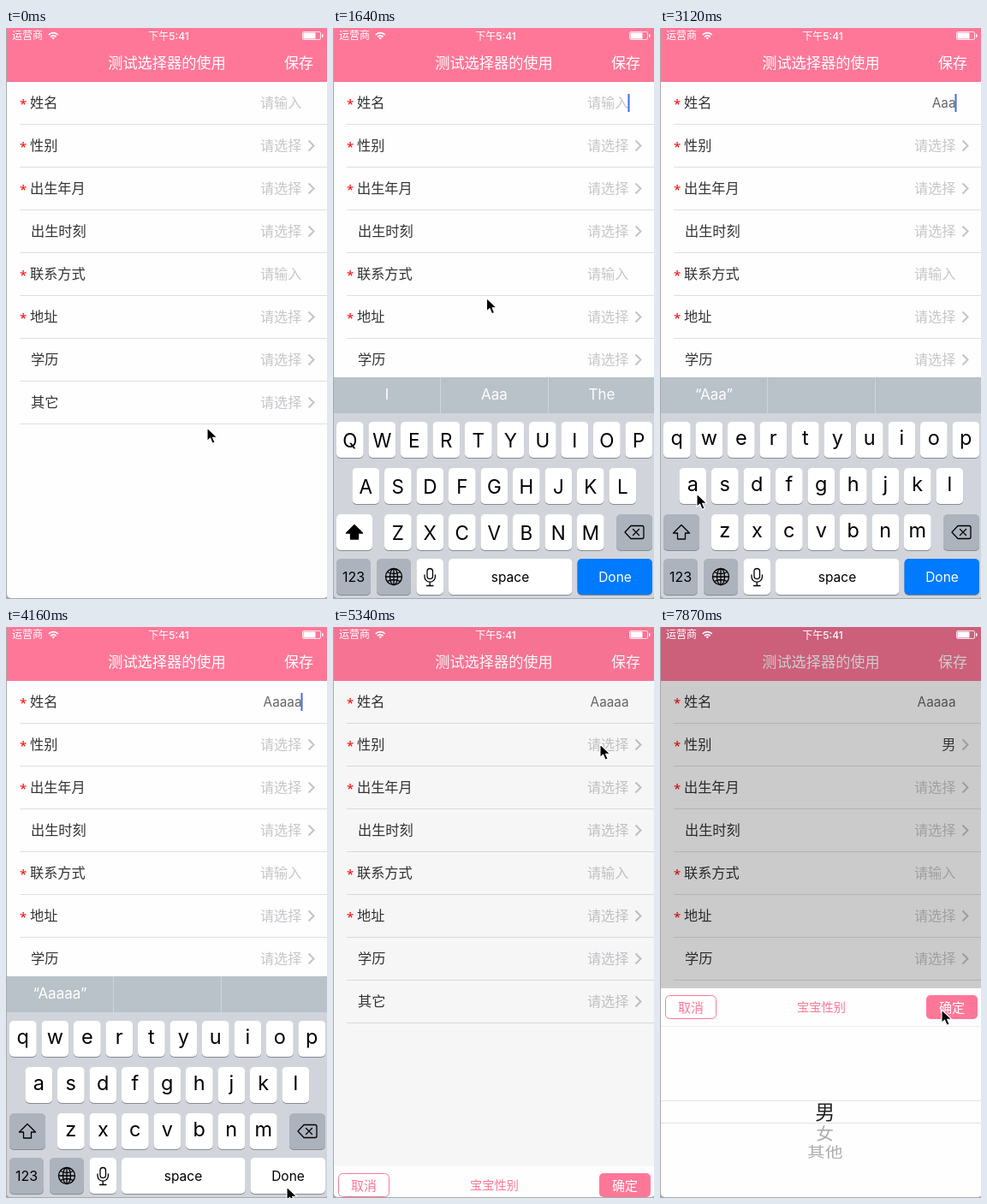
Write an HTML page that moves like this. It is 375 by 667 pixels and loops after 8000 ms.

```html
<!DOCTYPE html>
<html lang="zh-CN">
<head>
<meta charset="utf-8">
<title>测试选择器的使用</title>
<style>
  html, body { margin: 0; width: 100%; height: 100%; overflow: hidden; background: #a9a9a9; }
  svg { display: block; width: 100vw; height: 100vh; }
  text { font-family: Inter, "Noto Sans CJK SC", "Noto Sans CJK", sans-serif; white-space: pre; }
  .icon { fill: none; stroke: #000; stroke-width: 1.3; stroke-linejoin: round; stroke-linecap: round; }
</style>
</head>
<body>
<svg id="stage" viewBox="0 0 375 667"></svg>
<script>
const PINK = '#ff7798';
const TICK = 148.2, FIRST_TICK = 296, LOOP = 8000;

// ---- markup helpers; y is the visual middle of the line ----
const rect = (x, y, w, h, fill, extra = '') =>
  `<rect x="${x}" y="${y}" width="${w}" height="${h}" fill="${fill}" ${extra}/>`;
const text = (x, y, str, size, fill, anchor = 'start', extra = '') =>
  `<text x="${x}" y="${y + size * 0.37}" font-size="${size}" fill="${fill}" text-anchor="${anchor}" ${extra}>${str}</text>`;
const group = (id, body) => `<g id="${id}">${body}</g>`;

// ---- form ----
const rows = [
  ['姓名', true, '请输入'], ['性别', true, '请选择'], ['出生年月', true, '请选择'],
  ['出生时刻', false, '请选择'], ['联系方式', true, '请输入'], ['地址', true, '请选择'],
  ['学历', false, '请选择'], ['其它', false, '请选择']
];

function formRow([label, required, hint], i) {
  const y = 87 + 50 * i;
  return (required ? text(16, y + 1, '*', 15, '#f00', 'start', 'style="font-family:\'Noto Sans\',sans-serif"') : '') +
    text(required ? 28 : 29, y, label, 16.2, '#333') +
    text(345.5, y, hint, 16.2, '#c7c7cb', 'end', `id="value${i}"`) +
    (hint === '请选择'
      ? `<path d="M353.5 ${y - 5.5}l6 6-6 6" fill="none" stroke="#c4c4c6" stroke-width="2"/>` : '') +
    rect(16, y + 25, 359, 1, '#dfdfe1');
}

const form = rect(1, 0, 375, 667, '#fefefe') + rect(1, 0, 375, 63, PINK) +
  text(188, 41, '测试选择器的使用', 17.2, '#fff', 'middle', 'font-weight="500"') +
  text(325, 41, '保存', 17, '#fff') +
  rows.map(formRow).join('') +
  rect(344.5, 77, 2, 21, '#4169e1', 'id="caret"');

const statusBar =
  text(7, 9, '运营商', 12, '#fff') +
  text(190, 9.3, '下午5:41', 12, '#fff', 'middle', 'font-weight="500"') +
  `<g fill="none" stroke="#fff" stroke-width="1.7"><path d="M49.8 8a7.6 7.6 0 0 1 11 0M52 10.3a4.6 4.6 0 0 1 6.6 0"/></g>
   <path d="M53.6 11.6a2.4 2.4 0 0 1 3.4 0L55.3 13.6z" fill="#fff"/>` +
  rect(346.5, 4.5, 21, 9, 'none', 'rx="1.5" stroke="#fff" stroke-width=".8"') +
  rect(347.5, 5.5, 14, 7, '#fff', 'rx=".6"') +
  rect(369, 7, 1.5, 4, '#fff', 'rx=".7"');

// ---- keyboard ----
const key = (x, y, w, fill = '#fff', id = '') =>
  rect(x, y + 1, w, 42, '#878b91', 'rx="5"') +
  rect(x, y, w, 42, fill, `rx="5" ${id && `id="${id}"`}`);
const letterRows = [['QWERTYUIOP', 4, 460], ['ASDFGHJKL', 22.5, 514], ['ZXCVBNM', 60, 568]];
const eachLetter = fn => letterRows.map(([chars, x, y]) =>
  [...chars].map((c, i) => fn(c, x + 37.5 * i, y)).join('')).join('');
const GREY = '#adb3bd';

const icons = `<g class="icon">
  <path id="shift" d="M25 580.5l9.5 9.5h-5v7h-9v-7h-5z"/>
  <path d="M341 589l7-7.5h13q2 0 2 2v11q0 2-2 2h-13zM350.5 585.5l7 7m0-7l-7 7"/>
  <circle cx="71" cy="641" r="9.5"/><ellipse cx="71" cy="641" rx="4.5" ry="9.5"/>
  <path d="M71 631.5v19M61.5 641h19M63.5 635.5q7.5 4 15 0M63.5 646.5q7.5-4 15 0"/>
  <rect x="110" y="631.5" width="6.5" height="12" rx="3.2"/>
  <path d="M107 639v2a6.2 6.2 0 0 0 12.4 0v-2M113.2 647.5v4M109.5 651.5h7.5"/></g>`;

const popup = `<path d="M16 459h45q7 0 7 7v33c0 9-13.5 9-13.5 19v33q0 5-5 5h-22q-5 0-5-5v-33c0-10-13.5-10-13.5-19v-33q0-7 7-7z"
  fill="#fff" stroke="#9a9ea5" stroke-width=".7"/>` +
  text(38.3, 484, 'A', 34, '#000', 'middle', 'id="popupLetter"');

const keyboard = rect(0, 408, 376, 260, '#d1d5db') + rect(0, 408, 376, 42, '#b9c1c9') +
  rect(125, 408, 1, 42, '#d1d5db') + rect(251, 408, 1, 42, '#d1d5db') +
  ['I', 'Aaa', 'The'].map((s, i) => text(63 + 125.5 * i, 427.5, s, 17, '#fff', 'middle', `id="hint${i}"`)).join('') +
  eachLetter((c, x, y) => key(x, y, 31.7)) +
  group('upper', eachLetter((c, x, y) => text(x + 15.8, y + 21.3, c, 22.5, '#000', 'middle'))) +
  group('lower', eachLetter((c, x, y) => text(x + 15.8, y + 18.7, c.toLowerCase(), 23.5, '#000', 'middle'))) +
  key(4, 568, 42, '#fff', 'shiftKey') + key(331, 568, 42, GREY) +
  key(4, 620, 40, GREY) + key(51, 620, 40, GREY) + key(97.5, 620, 31.5) +
  key(135, 620, 144.5) + key(285.5, 620, 87.5, '#007aff', 'doneKey') +
  text(24, 641.5, '123', 16, '#000', 'middle') +
  text(207, 641, 'space', 15.5, '#000', 'middle') +
  text(329.5, 641, 'Done', 15.5, '#fff', 'middle', 'id="doneText"') +
  icons + group('popup', popup);

// ---- picker ----
const options = ['男', '女', '其他'];
const picker = rect(0, 422, 376, 246, '#fefefe') + rect(0, 466, 376, 1, '#ececee') +
  rect(6.5, 430.5, 59, 27, '#fff', `rx="5" stroke="${PINK}"`) +
  text(36, 444, '取消', 15, PINK, 'middle') +
  text(188.5, 444, '宝宝性别', 14.2, PINK, 'middle') +
  rect(311, 430, 60, 28, PINK, 'rx="5"') +
  text(341, 444, '确定', 15, '#fff', 'middle') +
  rect(0, 553, 376, 1, '#e2e2e4') + rect(0, 579, 376, 1, '#e2e2e4') +
  options.map((o, i) => `<text id="option${i}" text-anchor="middle">${o}</text>`).join('');

const pointer = `<path d="M0 0v15.5l3.6-3.3 2.5 6 3-1.2-2.5-5.8h5z" fill="#000" stroke="#fff" stroke-width="1.1" stroke-linejoin="round"/>`;

document.getElementById('stage').innerHTML =
  `<clipPath id="screen"><rect x="1" y="-10" width="375" height="676" rx="5"/></clipPath>` +
  rect(0, 0, 375, 667, '#a9a9a9') +
  `<g clip-path="url(#screen)">` + form + group('keyboard', keyboard) +
  rect(1, 0, 375, 667, '#000', 'id="dim"') + statusBar + group('picker', picker) + `</g>` +
  group('pointer', pointer);

// ---- motion tables: [tick, values...] ----
const pointerPath = [
  [-1, 235, 467], [5, 316, 87], [7, 316, 87], [11, 43, 544], [23, 43, 544], [26, 328, 654],
  [27, 328, 654], [33, 312, 137], [34, 312, 137], [39, 219, 567], [40, 219, 567],
  [41, 222, 550], [42, 227, 525], [43, 229, 504], [44, 229, 524], [45, 226, 545], [46, 226, 545],
  [47, 224, 560], [48, 222, 575], [51, 329, 447]
];
const keyboardTop = [[6, 667], [7, 651], [8, 440], [9, 408], [26, 408], [27, 540], [28, 652], [29, 667]];
const pickerTop = [[33, 667], [34, 630], [35, 480], [36, 428], [37, 422]];
const wheelOffset = [[40, 0], [41, 0.4], [42, 1.2], [43, 2], [44, 1.6], [45, 1], [46, 1], [47, 0.7], [48, 0.2], [49, 0]];

function track(table, tick) {
  const next = table.findIndex(step => step[0] > tick);
  if (next === 0) return table[0].slice(1);
  if (next < 0) return table.at(-1).slice(1);
  const from = table[next - 1], to = table[next];
  const p = (tick - from[0]) / (to[0] - from[0]);
  const eased = p * p * (3 - 2 * p);
  return from.slice(1).map((v, i) => v + (to[i + 1] - v) * eased);
}

const $ = id => document.getElementById(id);
const set = (id, attrs) => Object.entries(attrs).forEach(([k, v]) => $(id).setAttribute(k, v));
const show = (id, on) => set(id, { visibility: on ? 'visible' : 'hidden' });
const setValue = (i, value, color) => {
  $('value' + i).textContent = value || rows[i][2];
  set('value' + i, { fill: value ? color : '#c7c7cb' });
};

function drawWheel(offset) {
  options.forEach((_, i) => {
    const angle = (i - offset) * 0.348;
    const active = Math.abs(angle) < 0.18;
    const size = active ? 23 : 20.8;
    set('option' + i, {
      transform: `translate(192.7 ${566.5 + 73 * Math.sin(angle)}) scale(1 ${Math.cos(angle)})`,
      y: size * 0.38, 'font-size': size, fill: active ? '#222' : '#acacae'
    });
  });
}

function draw(tick) {
  const [px, py] = track(pointerPath, tick);
  set('pointer', { transform: `translate(${px} ${py})` });

  // one letter every two ticks from 15 on
  const typed = 'Aaaaa'.slice(0, Math.max(0, Math.floor((tick - 13) / 2)));
  setValue(0, typed, '#666');
  setValue(1, tick >= 51 ? '男' : '', '#444');
  $('value0').setAttribute('font-size', typed ? 15.3 : 16.2);
  show('caret', tick >= 8 && tick < 27 && !(tick >= 11 && tick <= 13));

  const caps = !typed, donePressed = tick >= 26;
  set('keyboard', { transform: `translate(0 ${track(keyboardTop, tick)[0] - 408})` });
  show('upper', caps);
  show('lower', !caps);
  set('shiftKey', { fill: caps ? '#fff' : GREY });
  set('shift', { fill: caps ? '#000' : 'none' });
  set('doneKey', { fill: donePressed ? '#fff' : '#007aff' });
  set('doneText', { fill: donePressed ? '#000' : '#fff' });
  ['I', 'Aaa', 'The'].forEach((word, i) => {
    $('hint' + i).textContent = tick < 9 ? '' : caps ? word : i ? '' : `“${typed}”`;
  });
  show('popup', tick >= 14 && tick <= 22 && tick % 2 === 0);
  $('popupLetter').textContent = caps ? 'A' : 'a';

  const top = track(pickerTop, tick)[0];
  set('picker', { transform: `translate(0 ${top - 422})` });
  set('dim', { opacity: 0.2 * (667 - top) / 245 });
  drawWheel(track(wheelOffset, tick)[0]);
}

const start = performance.now();
let shown = null;
function frame() {
  const time = (performance.now() - start) % LOOP;
  const tick = Math.max(-1, Math.floor((time - FIRST_TICK) / TICK));
  if (tick !== shown) draw(shown = tick);
  requestAnimationFrame(frame);
}
frame();
</script>
</body>
</html>
```
